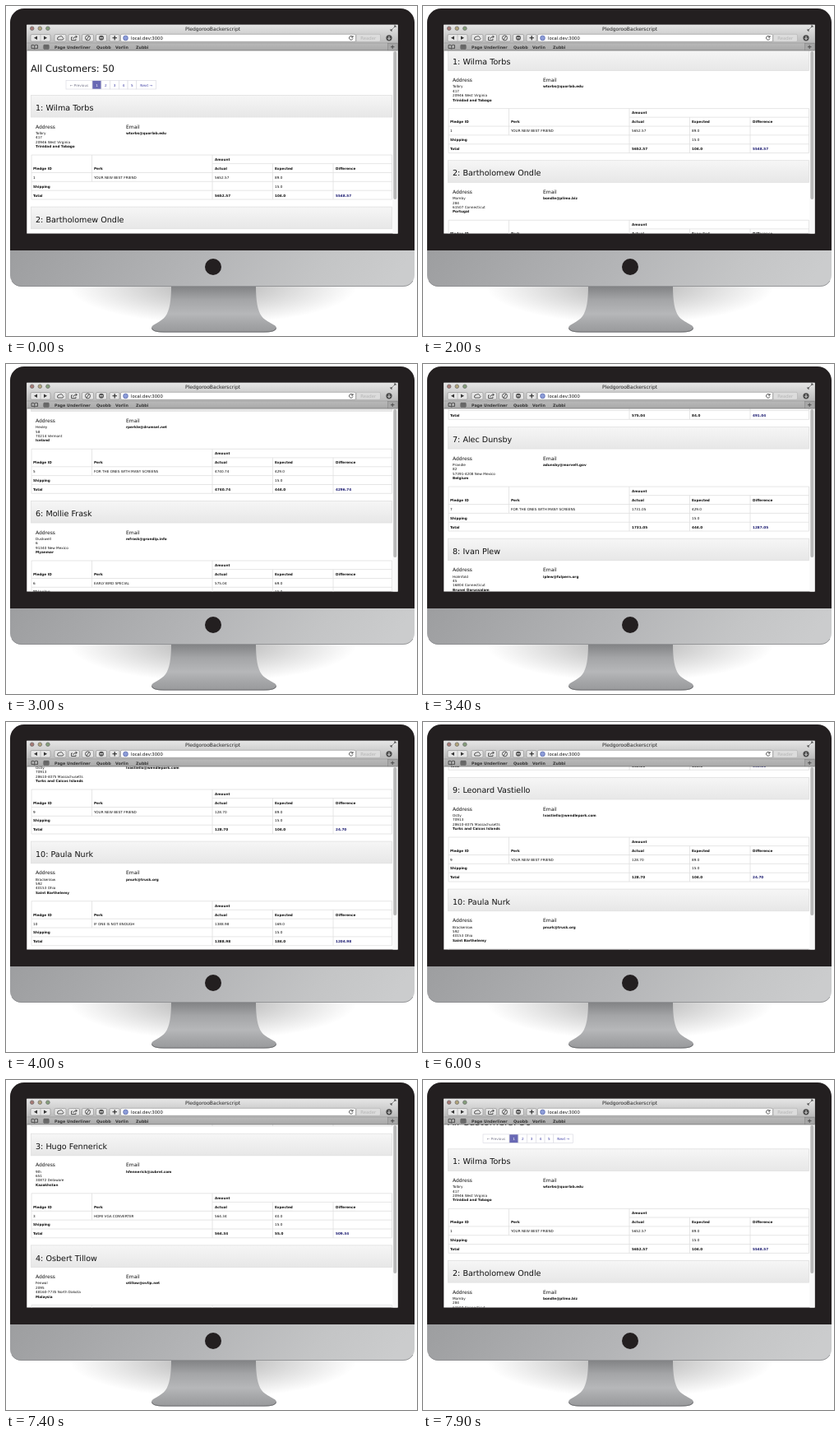
Animation, 500 px wide and 401 px high, one loop 8000 ms. Source, as an HTML page:

```html
<!DOCTYPE html>
<html lang="en">
<head>
<meta charset="utf-8">
<title>Customer list</title>
<style>
  html, body { margin: 0; width: 100%; height: 100%; overflow: hidden; background: #fff; }
  svg { display: block; width: 100%; height: 100%; }
  text { font-family: "DejaVu Sans", Verdana, sans-serif; text-rendering: geometricPrecision; fill: #111; white-space: pre; }
</style>
</head>
<body>
<svg viewBox="0 0 500 401">
  <defs>
    <linearGradient id="chin" x2="1" y2=".06">
      <stop stop-color="#9d9ea0"/><stop offset=".5" stop-color="#b4b5b7"/>
      <stop offset=".8" stop-color="#c4c5c6"/><stop offset="1" stop-color="#cbcccd"/>
    </linearGradient>
    <linearGradient id="neck" x2="0" y2="1">
      <stop stop-color="#808183"/><stop offset=".3" stop-color="#a4a5a7"/>
      <stop offset=".6" stop-color="#b6b7b9"/><stop offset=".8" stop-color="#a6a7a9"/>
      <stop offset="1" stop-color="#98999b"/>
    </linearGradient>
    <radialGradient id="shadow">
      <stop stop-color="#333" stop-opacity=".4"/><stop offset=".35" stop-color="#333" stop-opacity=".25"/>
      <stop offset="1" stop-color="#333" stop-opacity="0"/>
    </radialGradient>
    <linearGradient id="bar" x2="0" y2="1">
      <stop stop-color="#e6e6e6"/><stop offset="1" stop-color="#a8a8a8"/>
    </linearGradient>
    <linearGradient id="heading" x2="0" y2="1">
      <stop stop-color="#f6f6f6"/><stop offset="1" stop-color="#e7e7e7"/>
    </linearGradient>
    <clipPath id="view"><rect x="25.300" y="54" width="451.300" height="222.500"/></clipPath>
  </defs>

  <!-- stand -->
  <ellipse cx="252" cy="341" rx="175" ry="45" fill="url(#shadow)"/>
  <path d="M201 340H304C304 358 306 370 311 377C316 384 329 387 329 391Q329 396.500 314 396.500H192Q177 396.500 177 391C177 387 189 384 194 377C199 370 201 358 201 340Z" fill="url(#neck)"/>
  <path d="M177.500 391.500Q178 396 192 396H314Q328 396 328.500 391.500" fill="none" stroke="#707173"/>

  <!-- case -->
  <path d="M5 297.500V20A17 17 0 0 1 22 3H480A17 17 0 0 1 497 20V297.500Z" fill="#231f20"/>
  <path d="M5 297H497V327A14 14 0 0 1 483 341H19A14 14 0 0 1 5 327Z" fill="url(#chin)"/>
  <path d="M7 334Q11 340.500 19 340.500H483Q491 340.500 495 334" fill="none" stroke="#8a8b8d" stroke-width=".8"/>
  <circle cx="252" cy="317" r="10" fill="#231f20"/>

  <rect x="25.300" y="22.800" width="451.300" height="253.700" fill="#fff"/>
  <g clip-path="url(#view)"><g id="page"></g></g>
  <rect x="470.500" y="54" width="6.100" height="222.500" fill="#f8f8f8"/>
  <rect x="471.300" y="55" width="4" height="180" rx="2" fill="#b9b9b9"/>
  <g id="browser"></g>
</svg>

<script>
const text = (x, y, size, value, attrs = '') =>
  `<text x="${x}" y="${y + size * 0.36 + 0.4}" font-size="${size}" ${attrs}>${value}</text>`;
const rect = (x, y, w, h, attrs) => `<rect x="${x}" y="${y}" width="${w}" height="${h}" ${attrs}/>`;
const path = (d, attrs) => `<path d="${d}" ${attrs}/>`;
const circle = (x, y, r, attrs) => `<circle cx="${x}" cy="${y}" r="${r}" ${attrs}/>`;

const BOLD = 'font-weight="bold"', MIDDLE = 'text-anchor="middle"';
const SMALL = 4.2, PITCH = 135.7;
const LINE = 'fill="none" stroke="#e0e0e0" stroke-width=".8"';
const ICON = 'fill="none" stroke="#444" stroke-width=".9"';

// name, email domain, address lines, perk, paid amount, price
const customers = [
  ['Wilma Torbs', 'quorlab.edu', ['Tolbry', '417', '20946 West Virginia', 'Trinidad and Tobago'], 'YOUR NEW BEST FRIEND', 5652.57, 89],
  ['Bartholomew Ondle', 'plimo.biz', ['Mornby', '284', '61507 Connecticut', 'Portugal'], 'EARLY BIRD SPECIAL', 912.4, 69],
  ['Hugo Fennerick', 'zubrel.com', ['9th', '651', '30872 Delaware', 'Kazakhstan'], 'HDMI VGA CONVERTER', 564.34, 40],
  ['Osbert Tillow', 'ovlip.net', ['Fenwol', '2095', '48160-7735 North Dakota', 'Malaysia'], 'VGA ADAPTER', 1130.17, 29],
  ['Ronald Perkle', 'drumsel.net', ['Hexley', '58', '70214 Vermont', 'Iceland'], 'FOR THE ONES WITH MANY SCREENS', 4740.74, 429],
  ['Mollie Frask', 'grondip.info', ['Duskwell', '6', '91340 New Mexico', 'Myanmar'], 'EARLY BIRD SPECIAL', 575.04, 69],
  ['Alec Dunsby', 'morvelt.gov', ['Prandle', '82', '57391-4208 New Mexico', 'Belgium'], 'FOR THE ONES WITH MANY SCREENS', 1731.05, 429],
  ['Ivan Plew', 'fulpern.org', ['Holmfold', '45', '16804 Connecticut', 'Brunei Darussalam'], 'YOUR NEW BEST FRIEND', 640.2, 89],
  ['Leonard Vastiello', 'wendlepark.com', ['Ostly', '70913', '28610-4075 Massachusetts', 'Turks and Caicos Islands'], 'YOUR NEW BEST FRIEND', 128.7, 89],
  ['Paula Nurk', 'trusk.org', ['Brackenlow', '592', '40153 Ohio', 'Saint Barthelemy'], 'IF ONE IS NOT ENOUGH', 1388.98, 169],
];

function customerTable(id, perk, paid, price) {
  const total = price + 15;
  const columns = [33, 107, 254, 327, 401];
  const row = (y, cells, attrs) =>
    cells.map((cell, i) => cell === '' ? '' : text(columns[i], y, SMALL, cell, attrs)).join('');
  return path('M31 181H469.5V235H31ZM251 191.600H469.500M31 202.500H469.500M31 213.300H469.500M31 224.200H469.500' +
      'M104.500 181V213.300M251 181V235M324.500 191.600V235M398 191.600V235', LINE) +
    row(186, ['', '', 'Amount'], BOLD) +
    row(197, ['Pledge ID', 'Perk', 'Actual', 'Expected', 'Difference'], BOLD) +
    row(208, [id, perk, paid.toFixed(2), price.toFixed(1)], '') +
    row(218.6, ['Shipping'], BOLD) + row(218.6, ['', '', '', '15.0'], '') +
    row(229.6, ['Total', '', paid.toFixed(2), total.toFixed(1)], BOLD) +
    text(401, 229.6, SMALL, (paid - total).toFixed(2), BOLD + ' style="fill:#1a1a70"');
}

function customerBlock([name, domain, address, perk, paid, price], index) {
  const [first, last] = name.split(' ');
  const email = `${first[0]}${last}@${domain}`.toLowerCase();
  return `<g transform="translate(0 ${index * PITCH})">` +
    rect(30.5, 108.4, 439, 26.6, 'fill="url(#heading)" stroke="#e0e0e0" stroke-width=".8"') +
    text(36, 123.2, 9.6, `${index + 1}: ${name}`) +
    text(36, 146, 6, 'Address') + text(146, 146, 6, 'Email') +
    address.map((line, i) => text(36, 154 + i * 5.4, SMALL, line, i === 3 ? BOLD : '')).join('') +
    text(146, 154, SMALL, email, BOLD) +
    customerTable(index + 1, perk, paid, price) + '</g>';
}

function pagination() {
  const edges = [73, 105, 116, 126.7, 137.4, 148.1, 158.8, 182.5];
  return ['← Previous', 1, 2, 3, 4, 5, 'Next →'].map((label, i) => {
    const left = edges[i], width = edges[i + 1] - left, current = i === 1;
    const color = current ? '#fff' : i ? '#3c3ca4' : '#77778c';
    return rect(left, 90.6, width, 10.4, `fill="${current ? '#6868b4' : '#fff'}" stroke="#dcdce4" stroke-width=".7"`) +
      text(left + width / 2, 96, SMALL, label, `${MIDDLE} style="fill:${color}"`);
  }).join('');
}

function browserBar() {
  const button = (x, w) => rect(x, 34.5, w, 8.6, 'rx="1.5" fill="#e6e6e6" stroke="#8c8c8c" stroke-width=".6"');
  const bookmarks = [[59, 'Page Underliner'], [110, 'Quobb'], [133, 'Vorlin'], [158, 'Zubbi']];
  const lights = ['#a87a76', '#b3a67c', '#86a07c'];
  return rect(25.3, 22.8, 451.3, 31.2, 'fill="url(#bar)"') +
    path('M25.300 45H476.600', 'stroke="#969696" stroke-width=".6"') +
    path('M25.300 54H476.600', 'stroke="#787878" stroke-width=".8"') +
    lights.map((fill, i) => circle(31.7 + i * 9.6, 27.2, 2.3, `fill="${fill}" stroke="#666" stroke-width=".7"`)).join('') +
    text(251.5, 27.2, 6, 'PledgorooBackerscript', MIDDLE + ' style="fill:#222"') +
    path('M471.500 26.500L474 24M472 24H474V26M470.500 27.500L468 30M468 28V30H470', ICON) +
    [[30, 24], [59, 14], [76, 13.5], [92.5, 14], [109.5, 13], [126, 12]].map(b => button(...b)).join('') +
    path('M38 36.500L34 38.800L38 41ZM46 36.500L50 38.800L46 41Z', 'fill="#333"') +
    path('M42 34.500V43', 'stroke="#aaa" stroke-width=".6"') +
    path('M63 41H69Q71 39.500 69 38.300Q68 35.500 65.500 37Q62 37.500 62.500 40Z', ICON) +
    path('M81 38H79.500V41.500H85V40M81.500 40Q82 37.500 86 37.300M84.500 36L86.500 37.300L84.500 39', ICON) +
    circle(99.5, 38.8, 3, ICON) + path('M101 36.500L98 41', ICON) +
    circle(116, 38.8, 3, 'fill="#555"') + path('M114 38.800H118', 'stroke="#eee" stroke-width="1"') +
    path('M129.500 38.800H135M132.200 36V41.600', 'stroke="#222" stroke-width="1.1"') +
    rect(139.5, 34.3, 286, 9, 'rx="1.5" fill="#fff" stroke="#8c8c8c" stroke-width=".6"') +
    circle(145.5, 38.9, 2.9, 'fill="#8c9cd8" stroke="#4858a0" stroke-width=".6"') +
    text(152, 38.7, 5.3, 'local.dev:3000') +
    path('M421.700 37.500A2.300 2.300 0 1 0 422 39.500M422 36V38H420', ICON) +
    rect(426, 34.3, 29.5, 9, 'rx="1.5" fill="#dcdcdc" stroke="#b0b0b0" stroke-width=".6"') +
    text(440.7, 38.7, 5.4, 'Reader', MIDDLE + ' style="fill:#b6b6b6"') +
    circle(466, 38.8, 3.6, 'fill="#4a4a4a"') +
    path('M466 36.800V40.600M464.500 39.200L466 40.700L467.500 39.200', 'fill="none" stroke="#eee" stroke-width=".9"') +
    path('M31 47.500Q33 46.700 34.700 48Q36.500 46.700 38.500 47.500V51.500Q36.500 51 34.700 52Q33 51 31 51.500ZM34.700 48V52', ICON) +
    path('M46 47.500H52V52H46ZM46 49.700H52M48 47.500V52M50 47.500V52', ICON) +
    bookmarks.map(([x, label]) => text(x, 49.4, 4.8, label, BOLD + ' style="fill:#333"')).join('') +
    rect(464.5, 45.5, 12.1, 8.3, 'fill="#a6a6a6" stroke="#808080" stroke-width=".5"') +
    path('M468 49.700H472.500M470.200 47.500V52', ICON);
}

const page = document.getElementById('page');
page.innerHTML = text(30, 75, 11.5, 'All Customers: 50') + pagination() +
  customers.map(customerBlock).join('');
document.getElementById('browser').innerHTML = browserBar();

// The page scrolls in 100 ms steps: 21 down, then back up.
const LOOP = 8000, STEPS = 21, DOWN = 56.41, UP = 58;
const stepsSince = (time, start) =>
  Math.min(STEPS, Math.max(0, Math.floor((time - start) / 100) + 1));

function scrollAt(time) {
  const down = stepsSince(time, 2000) * DOWN;
  return Math.max(0, down - stepsSince(time, 6000) * UP);
}

const began = performance.now();
function draw() {
  const time = (performance.now() - began) % LOOP;
  page.setAttribute('transform', `translate(0 ${-scrollAt(time)})`);
  requestAnimationFrame(draw);
}
draw();
</script>
</body>
</html>
```
